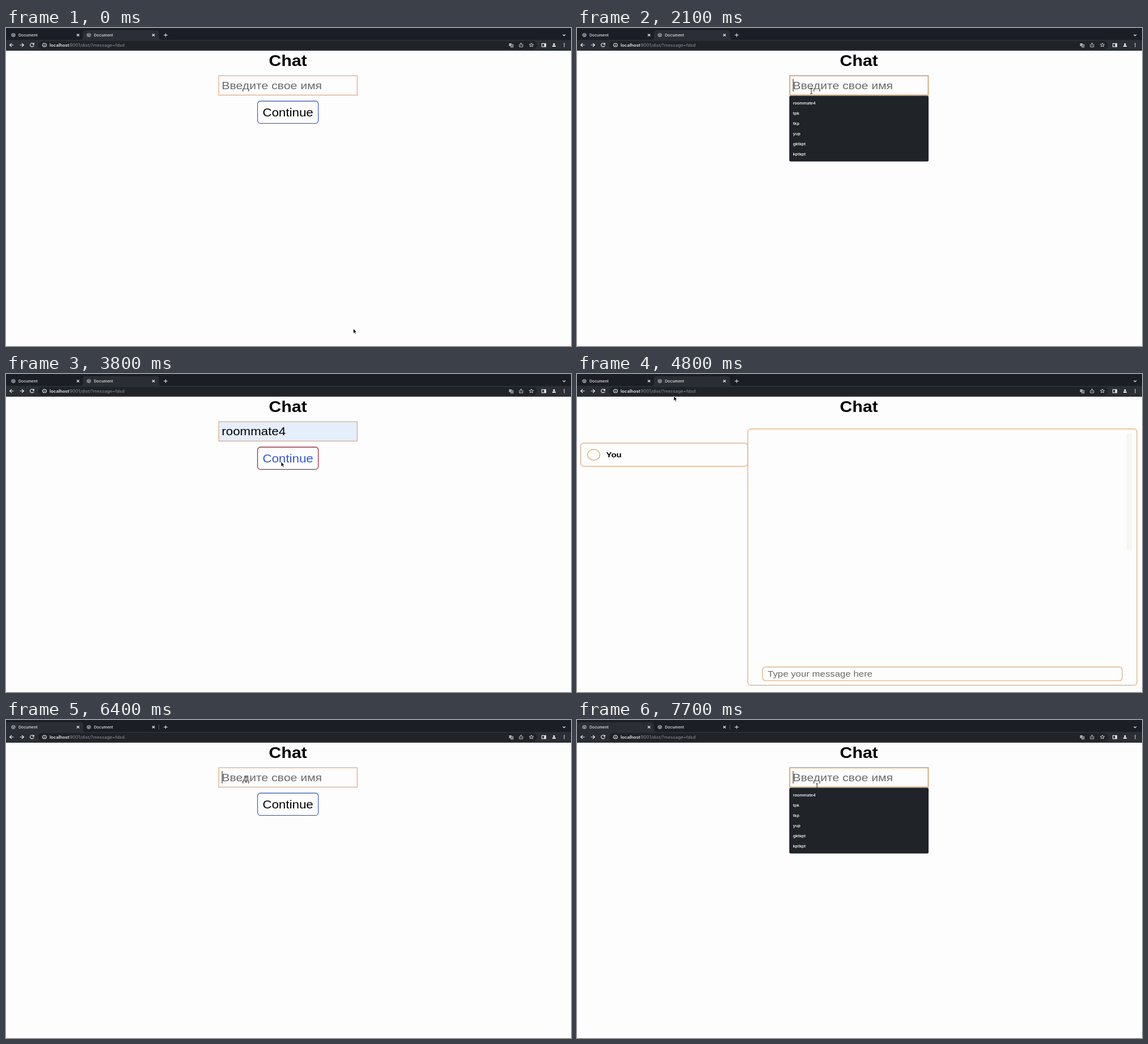
These frames come from a looping animation (998 by 561 pixels, 8000 ms). An HTML page:

```html
<!DOCTYPE html>
<html lang="en">
<head>
<meta charset="utf-8">
<title>Chat</title>
<style>
  html, body { margin: 0; width: 100%; height: 100%; overflow: hidden; background: #fdfdfd; }
  svg { display: block; width: 998px; height: 561px; }
  text { font-family: "Liberation Sans", Arial, sans-serif; white-space: pre; }
  .ui { font-family: Inter, Roboto, sans-serif; }
  .line { fill: none; stroke: #e4e6e9; stroke-width: 1.2; }
  .box { fill: #fdfdfd; stroke: #d9a778; stroke-width: 1.2; }
</style>
</head>
<body>
<svg id="stage" viewBox="0 0 998 561"></svg>
<script>
const ASPECT = 1.13; // the screen is shown wider than it was laid out
const LOOP = 8000;
const NAME = 'roommate4';
const HINTS = [NAME, 'tpk', 'tkp', 'yup', 'gktkpt', 'kptkpt'];

const text = (x, y, size, str, attrs = '') =>
  `<text transform="translate(${x} ${y}) scale(${ASPECT} 1)" font-size="${size}" ${attrs}>${str}</text>`;
const rect = (x, y, w, h, attrs = '') =>
  `<rect x="${x}" y="${y}" width="${w}" height="${h}" ${attrs}/>`;
const path = (d, attrs = 'class="line"') => `<path d="${d}" ${attrs}/>`;
const group = (id, ...parts) => `<g id="${id}">${parts.join('')}</g>`;

const tab = x =>
  `<ellipse cx="${x + 13}" cy="12.5" rx="3.4" ry="3" fill="#50545a" stroke="#c3c6ca" stroke-width=".8"/>` +
  path(`M${x + 10.5} 11.5l2.6 1.4 2.6-1.9M${x + 13} 13v2`, 'fill="none" stroke="#c3c6ca" stroke-width=".8"') +
  text(x + 22, 14.8, 6.1, 'Document', 'class="ui" font-weight="500" fill="#e8eaed"') +
  path(`M${x + 125} 10.5l4.4 4m0-4l-4.4 4`);

const browser = [
  rect(0, 0, 998, 40, 'fill="#1b1e24"'),
  path('M0 21H130q6 0 6-5V8q0-4 5-4H265q5 0 5 4v8q0 5 6 5H998V39.5H0Z', 'id="tabShape" fill="#2b2e34"'),
  rect(57, 23, 881, 14.5, 'rx="7" fill="#1f2227"'),
  tab(0), tab(133.3),
  path('M270 8v9', 'id="divider" stroke="#50545a" stroke-width="1"'),
  path('M278.5 12.5h7M282 9.4v6.2M983.5 11.5l2.3 2.2 2.3-2.2'),
  path('M13.5 30H6.8m3.2-3l-3.4 3 3.4 3M24.5 30h6.7m-3.2-3l3.4 3-3.4 3'),
  path('M49 28.2a3.5 3.1 0 1 0 .3 2.8M49.4 26.4v2.4h-2.7'),
  '<ellipse cx="68" cy="30" rx="3.4" ry="3" class="line" stroke-width=".9"/>',
  path('M68 29.7v2M68 28v.8'),
  text(77, 32.6, 6.9, 'localhost', 'class="ui" font-weight="600" fill="#e8eaed"'),
  text(110.3, 32.6, 7, ':9001/dist/?message=fdsd', 'class="ui" fill="#90949a"'),
  rect(888.5, 27, 4.5, 5, 'fill="#a9adb2"'),
  rect(891.5, 29, 4.5, 5, 'fill="#6f747a" stroke="#c3c6ca" stroke-width=".6"'),
  path('M908 29h-1.2v4.3h6V29h-1.2M909.8 31.5v-5m-1.7 1.5l1.7-1.5 1.7 1.5', 'fill="none" stroke="#d3d6d9" stroke-width=".9"'),
  path('M928 26.6l1.1 2.2 2.6.2-2 1.6.6 2.4-2.3-1.3-2.3 1.3.6-2.4-2-1.6 2.6-.2Z', 'fill="none" stroke="#e4e6e9" stroke-width=".9"'),
  rect(946.5, 27.5, 7, 5.5, 'class="line"'),
  rect(950.5, 27.5, 3, 5.5, 'fill="#e4e6e9"'),
  path('M965 33v-1q0-1.6 3-1.6t3 1.6v1Z', 'fill="#fff"'),
  '<ellipse cx="968" cy="28.5" rx="1.7" ry="1.6" fill="#fff"/>',
  ...[27.4, 30, 32.6].map(y => `<circle cx="986" cy="${y}" r=".9" fill="#e4e6e9"/>`)
].join('');

const form = group('form',
  rect(375.8, 84.2, 244.6, 34.2, 'id="field" class="box"'),
  text(381, 108, 18.8, 'Введите свое имя', 'id="hint" fill="#6b6b6b"'),
  text(381, 108, 19.8, NAME, 'id="value"'),
  rect(0, 90, 1, 22, 'id="caret" fill="#222"'),
  rect(444.4, 129, 107.2, 39.3, 'id="button" rx="5" fill="#fdfdfd" stroke-width="1.3"'),
  text(498, 155.6, 19.8, 'Continue', 'id="label" text-anchor="middle"'),
  group('list',
    rect(375, 119.5, 246, 116, 'rx="2.5" fill="#202328"'),
    rect(375, 123.5, 246, 18, 'id="hover" fill="#3b3e43"'),
    ...HINTS.map((s, i) => text(381.5, 134.8 + 18 * i, 6.4, s, 'class="ui" font-weight="600" fill="#f1f2f3"'))));

const chat = group('chat',
  rect(6.6, 121.8, 294.8, 41, 'rx="5" class="box"'),
  '<ellipse cx="29.6" cy="142.4" rx="10.8" ry="9.6" class="box" style="stroke:#cfa766"/>',
  text(51.5, 147.4, 13.3, 'You', 'font-weight="bold"'),
  rect(301.7, 96.8, 687.4, 452.4, 'rx="5.5" class="box"'),
  rect(971, 105, 9.5, 205, 'fill="#f6f6f2"'),
  rect(327.8, 516.8, 635.2, 24.2, 'rx="5" class="box"'),
  text(336.8, 534.2, 14.9, 'Type your message here', 'fill="#6b6b6b"'));

document.getElementById('stage').innerHTML =
  rect(0, 0, 998, 561, 'fill="#fdfdfd"') + browser +
  text(498, 67, 26.8, 'Chat', 'font-weight="bold" text-anchor="middle"') +
  form + chat +
  path('M0 0v8.2l2-1.7 1.3 3 1.4-.6-1.3-2.9h2.5Z', 'id="arrow" fill="#000" stroke="#fff" stroke-width=".6"') +
  path('M-2-5q2 0 2 1.2 0-1.2 2-1.2M0-4V4M-2 5q2 0 2-1.2 0 1.2 2 1.2', 'id="beam" fill="none" stroke="#222" stroke-width="1"');

const $ = id => document.getElementById(id);
const show = (id, on) => { $(id).style.display = on ? '' : 'none'; };
const within = (t, a, b) => t >= a && t < b;

// Pointer stops: time, x, y
const STOPS = [
  [0, 613.5, 530.5], [100, 613.5, 530.5], [900, 414, 110], [2000, 414, 111], [2100, 414, 111],
  [2400, 413, 130], [2900, 412.5, 130], [3500, 486, 155], [3900, 486, 155],
  [4800, 171, 39], [5200, 65, 11], [5600, 65, 11], [6300, 424, 105],
  [6700, 424, 105], [7600, 424, 117], [LOOP, 424, 117]
];
const ease = u => u * u * (3 - 2 * u);

function pointer(t) {
  const i = STOPS.findIndex(s => s[0] > t);
  const [t0, x0, y0] = STOPS[i - 1], [t1, x1, y1] = STOPS[i];
  const u = ease((t - t0) / (t1 - t0));
  return [x0 + (x1 - x0) * u, y0 + (y1 - y0) * u];
}

function draw(now) {
  const t = Math.floor(now % LOOP / 100) * 100;
  const [x, y] = pointer(t);
  const over = (l, top, r, b) => x > l && x < r && y > top && y < b;

  const chatting = within(t, 4000, 5400);
  const firstTab = t >= 5400;
  const open = within(t, 1100, 2700) || t >= 6500;
  const hovering = open && over(375, 123, 621, 141);
  const chosen = within(t, 2700, 5400);
  const filled = chosen || hovering;
  const onButton = !open && over(444, 129, 552, 168);

  show('form', !chatting);
  show('chat', chatting);
  show('list', open);
  show('hover', hovering);
  show('hint', !filled);
  show('value', filled);
  show('caret', within(t, 1000, 3300) || firstTab);
  $('caret').setAttribute('x', chosen ? 493 : 381.3);
  $('field').style.fill = filled ? '#e5eefb' : '#fdfdfd';
  $('field').style.strokeWidth = open ? 1.9 : 1.2;
  $('button').style.stroke = onButton ? '#a52a35' : '#4468d8';
  $('label').style.fill = onButton ? '#3557d0' : '#000';

  $('tabShape').setAttribute('d', firstTab
    ? 'M0 4H131q5 0 5 4v8q0 5 6 5H998V39.5H0Z'
    : 'M0 21H130q6 0 6-5V8q0-4 5-4H265q5 0 5 4v8q0 5 6 5H998V39.5H0Z');
  show('divider', firstTab);

  const typing = !chatting && over(375, 84, 621, 119);
  show('beam', typing);
  show('arrow', !typing);
  $(typing ? 'beam' : 'arrow').setAttribute('transform', `translate(${x} ${y})`);
}

const start = performance.now();
function tick() {
  draw(performance.now() - start);
  requestAnimationFrame(tick);
}
tick();
</script>
</body>
</html>
```
